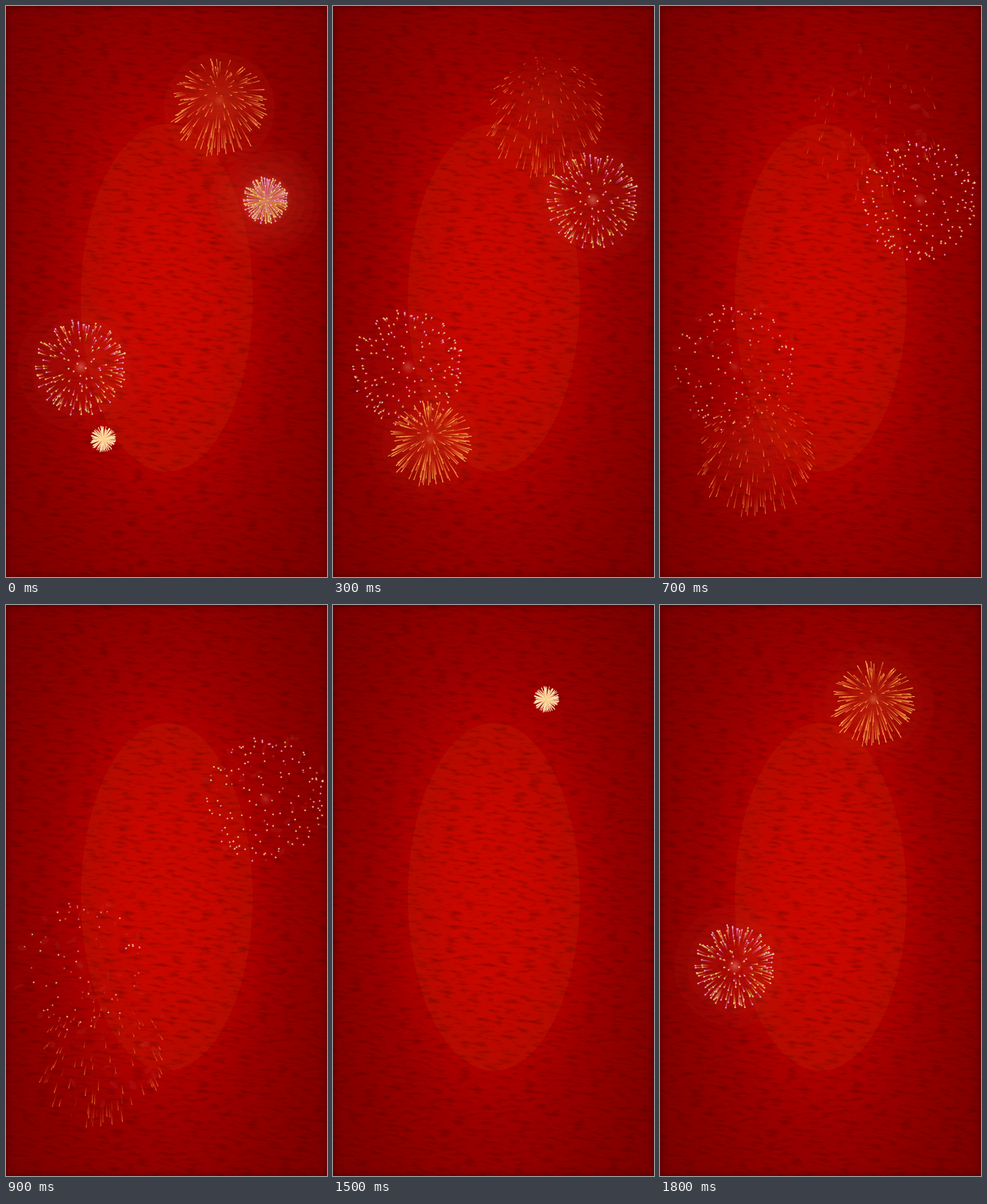
Recreate the animation shown at these times as an HTML page with a canvas. Size 561x998 px, loop 1900 ms.

```html
<!DOCTYPE html>
<html lang="en">
<head>
<meta charset="utf-8">
<title>Fireworks on red paper</title>
<style>
  html, body { margin: 0; width: 100%; height: 100%; overflow: hidden; background: #850000; }
  .stage { position: relative; width: 561px; height: 998px; overflow: hidden; }
  .stage > * { position: absolute; left: 0; top: 0; width: 561px; height: 998px; display: block; }
  .edge { box-shadow: inset 0 0 14px rgba(55, 0, 0, .65); }
</style>
</head>
<body>
<div class="stage">
  <svg viewBox="0 0 561 998">
    <defs>
      <radialGradient id="paper" gradientUnits="userSpaceOnUse" cx="0" cy="0" r="2.6"
        gradientTransform="translate(281 510) scale(150 304)">
        <stop offset="0" stop-color="#cc0800"/>
        <stop offset=".19" stop-color="#c80700"/>
        <stop offset=".3" stop-color="#be0800"/>
        <stop offset=".384" stop-color="#b50b00"/>
        <stop offset=".385" stop-color="#af0000"/>
        <stop offset=".53" stop-color="#9a0000"/>
        <stop offset=".73" stop-color="#890000"/>
        <stop offset="1" stop-color="#780000"/>
      </radialGradient>
      <filter id="grain" x="0" y="0" width="100%" height="100%" color-interpolation-filters="sRGB">
        <feTurbulence type="fractalNoise" baseFrequency=".05 .19" numOctaves="3" seed="8"/>
        <feColorMatrix values="0 0 0 0 .2  0 0 0 0 0  0 0 0 0 0  .8 0 0 0 -.38"/>
      </filter>
    </defs>
    <rect width="561" height="998" fill="url(#paper)"/>
    <rect width="561" height="998" filter="url(#grain)" transform="rotate(6 281 499) scale(1.15) translate(-40 -60)"/>
  </svg>
  <div class="edge"></div>
  <canvas id="sky" width="561" height="998"></canvas>
</div>
<script>
const LOOP = 1900, STEP = 100, VISIBLE = 1200;
const ctx = document.getElementById('sky').getContext('2d');

function randomFrom(seed) {
  return () => {
    seed = (seed + 0x6D2B79F5) | 0;
    let n = Math.imul(seed ^ (seed >>> 15), 1 | seed);
    n = (n + Math.imul(n ^ (n >>> 7), 61 | n)) ^ n;
    return ((n ^ (n >>> 14)) >>> 0) / 4294967296;
  };
}
const clamp = v => Math.max(0, Math.min(1, v));
const mix = (a, b, k) => a.map((v, i) => v + (b[i] - v) * clamp(k));
const rgba = (c, alpha) => `rgba(${c.map(Math.round)},${clamp(alpha)})`;

const GOLD = { radius: 128, lead: 84, tau: 425, fall: .072, trail: 220 };
const COLOR = { radius: 114, lead: 150, tau: 340, fall: 0, trail: 140 };
const OLIVE = [205, 165, 50], PINK = [215, 85, 175], ORANGE = [230, 125, 65];

// Sparks lie on a sphere seen from the front.
function makeSparks(kind, count, seed) {
  const rnd = randomFrom(seed);
  kind.sparks = Array.from({ length: count }, (_, i) => {
    const depth = 1 - 2 * (i + .5) / count;
    const angle = i * 2.39996 + (rnd() - .5) * .7;
    const speed = Math.sqrt(1 - depth * depth) * (.88 + .14 * rnd());
    const x = Math.cos(angle) * speed, y = Math.sin(angle) * speed;
    const pick = rnd(), pinkShare = x > 0 && y < 0 ? .55 : .33;
    return {
      x, y, life: 730 + 620 * rnd(), light: .65 + .35 * rnd(), tail: .7 + .5 * rnd(),
      tint: pick < pinkShare ? PINK : pick < .85 ? OLIVE : ORANGE
    };
  });
  kind.dust = Array.from({ length: 260 }, () => {
    const angle = rnd() * 2 * Math.PI, r = Math.sqrt(rnd()) * .88;
    return [Math.cos(angle) * r, Math.sin(angle) * r];
  });
  kind.smoke = Array.from({ length: 22 }, () => {
    const angle = rnd() * 2 * Math.PI, r = 118 * Math.sqrt(rnd());
    return [Math.cos(angle) * r, Math.sin(angle) * r, 3 + 8 * rnd(), 2 + 4 * rnd(), rnd() * 3];
  });
}
makeSparks(GOLD, 150, 21);
makeSparks(COLOR, 165, 64);

const reach = (kind, age) =>
  kind.radius * (1 - Math.exp(-Math.max(0, age + kind.lead) / kind.tau));
function drop(kind, age) {
  const t = Math.max(0, age);
  return kind.fall * (t - 300 * (1 - Math.exp(-t / 300)));
}
const place = (kind, x, y, age) =>
  [x * reach(kind, age), y * reach(kind, age) + drop(kind, age)];

function disc(x, y, r, fill) {
  ctx.fillStyle = fill;
  ctx.beginPath();
  ctx.arc(x, y, r, 0, 2 * Math.PI);
  ctx.fill();
}

function glow(r, color, alpha, y = 0) {
  const g = ctx.createRadialGradient(0, y, 0, 0, y, r);
  g.addColorStop(0, rgba(color, alpha));
  g.addColorStop(1, rgba(color, 0));
  disc(0, y, r, g);
}

function streak(from, to, tail, head, alpha, width) {
  const g = ctx.createLinearGradient(...from, ...to);
  g.addColorStop(0, rgba(tail, 0));
  g.addColorStop(.45, rgba(tail, alpha * .65));
  g.addColorStop(1, rgba(head, alpha));
  ctx.strokeStyle = g;
  ctx.lineWidth = width;
  ctx.beginPath();
  ctx.moveTo(...from);
  ctx.lineTo(...to);
  ctx.stroke();
}

function drawDust(kind, age, color, alpha) {
  ctx.fillStyle = rgba(color, alpha);
  for (const [dx, dy] of kind.dust) {
    const [x, y] = place(kind, dx, dy, age);
    ctx.fillRect(x, y, 1, 1);
  }
}

function drawSmoke(kind, age) {
  ctx.fillStyle = rgba([200, 75, 60], .13 * clamp((age - 600) / 300));
  for (const [x, y, rx, ry, turn] of kind.smoke) {
    ctx.beginPath();
    ctx.ellipse(x, y, rx, ry, turn, 0, 2 * Math.PI);
    ctx.fill();
  }
}

function drawGold(age) {
  const fade = clamp((950 - age) / 500);
  if (age > 0) {
    const y = drop(GOLD, age);
    disc(0, y, age < 400 ? 106 : 98, rgba([205, 70, 25], .05 * fade));
    disc(0, y, reach(GOLD, age) + 9, rgba([205, 70, 25], .05 * fade));
    glow(reach(GOLD, age) * .85, [235, 90, 30], .3 * fade, y * .5);
  }
  drawSmoke(GOLD, age);
  drawDust(GOLD, age, [230, 130, 70], age ? .3 * fade : 0);
  const head = mix(mix([255, 238, 190], [255, 195, 95], age / 200), [238, 128, 45], (age - 200) / 800);
  const tail = mix(mix([255, 215, 150], [240, 130, 50], age / 250), [205, 55, 20], (age - 250) / 800);
  for (const s of GOLD.sparks) {
    const alpha = s.light * clamp((s.life - age) / 220);
    if (!alpha) continue;
    const from = place(GOLD, s.x, s.y, age - GOLD.trail * s.tail);
    streak(from, place(GOLD, s.x, s.y, age), tail, head, alpha, age < 700 ? 1.6 : 1.4);
  }
  if (age < 500) glow(10, [255, 210, 150], .6 - age / 900);
}

function drawColor(age) {
  const fade = clamp((850 - age) / 650);
  const halo = 98 + 13 * clamp(age / 300);
  const rings = age < 100 ? [1, .86, .7, .55, .46] : [1, .78];
  for (const k of rings) disc(0, 0, halo * k, rgba([205, 80, 45], .055 * fade));
  drawSmoke(COLOR, age);
  drawDust(COLOR, age, [225, 110, 90], .2 * fade);
  if (age < 200) glow(45, [225, 160, 80], .5 - age / 400);
  glow(13, [245, 155, 130], .6 - age / 2200);
  for (const s of COLOR.sparks) {
    const alpha = clamp((s.life + 150 - age) / 250);
    if (!alpha) continue;
    const from = place(COLOR, s.x, s.y, age - COLOR.trail * s.tail);
    const to = place(COLOR, s.x, s.y, age);
    streak(from, to, s.tint, mix(s.tint, [255, 240, 190], .45), alpha * s.light, 1.6);
    disc(...to, 2.1, rgba(s.tint, .45 * alpha));
    disc(...to, .6 + .45 * s.light, rgba(mix(s.tint, [255, 250, 235], .8), alpha));
  }
}

const bursts = [
  { x: 131, y: 631, start: 1600, draw: drawColor },
  { x: 454, y: 339, start: 0, draw: drawColor },
  { x: 373, y: 165, start: 1500, draw: drawGold },
  { x: 170, y: 757, start: 0, draw: drawGold }
];

function frame() {
  const time = Math.floor(performance.now() % LOOP / STEP) * STEP;
  ctx.clearRect(0, 0, 561, 998);
  ctx.lineCap = 'round';
  for (const burst of bursts) {
    const age = (time - burst.start + LOOP) % LOOP;
    if (age > VISIBLE) continue;
    ctx.save();
    ctx.translate(burst.x, burst.y);
    burst.draw(age);
    ctx.restore();
  }
  requestAnimationFrame(frame);
}
frame();
</script>
</body>
</html>
```
